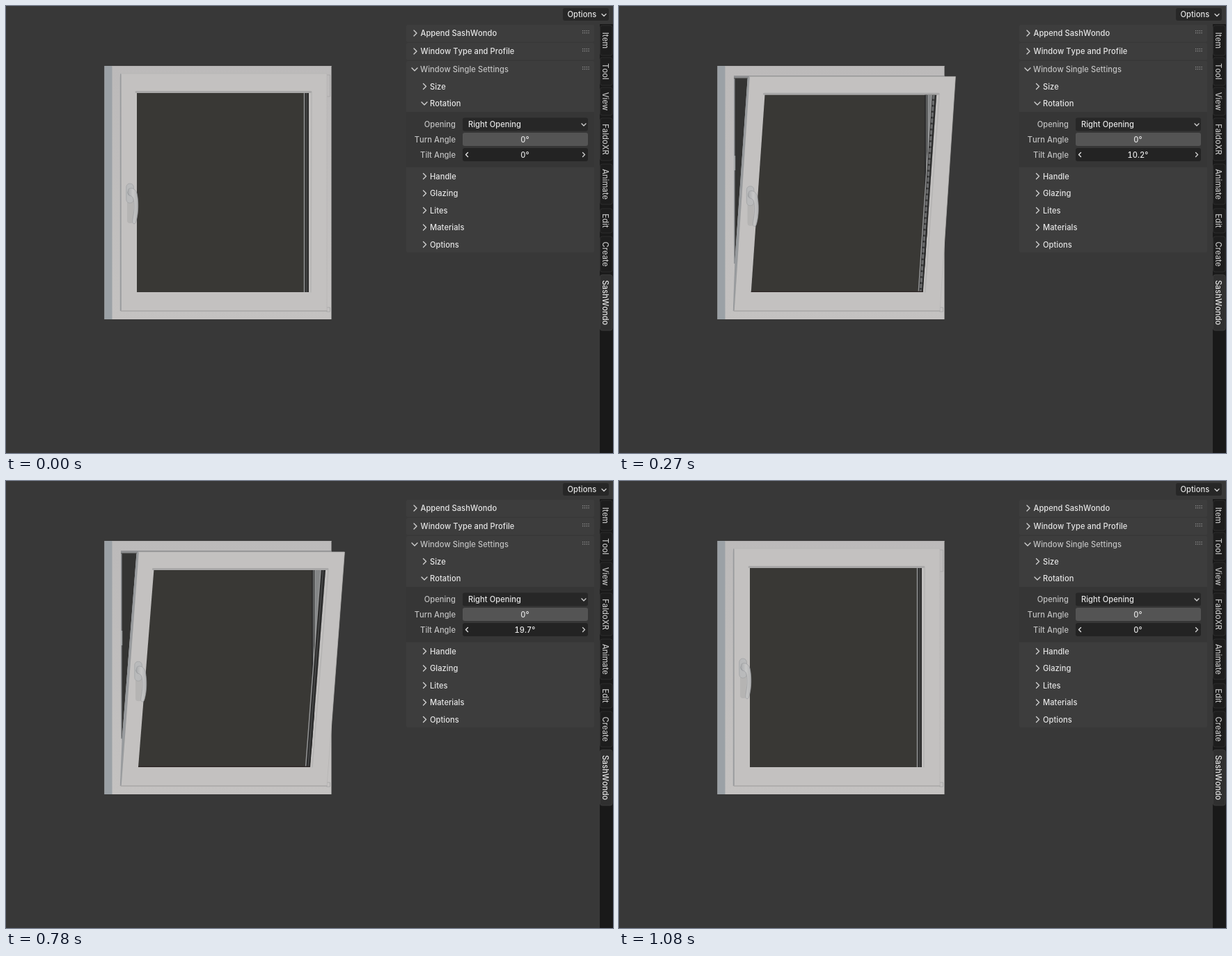
Write an HTML page that moves like this. It is 872x642 px and loops after 1.26 s.

```html
<!DOCTYPE html>
<html lang="en">
<head>
<meta charset="utf-8">
<title>Tilting window</title>
<style>
  html, body { margin: 0; width: 100%; height: 100%; overflow: hidden; background: #383838; }
  svg { display: block; width: 872px; height: 642px; }
  text {
    font: 500 11.1px Inter, "Open Sans", sans-serif;
    font-kerning: none;
    font-variant-numeric: tabular-nums;
    letter-spacing: .06px;
    fill: #e6e6e6;
  }
  .dim { fill: #c2c2c2; }
  .tab { fill: #c4c4c4; }
  .line { fill: none; stroke-linecap: round; stroke-linejoin: round; }
  .dash { fill: none; }
</style>
</head>
<body>
<svg viewBox="0 0 872 642" xmlns="http://www.w3.org/2000/svg">
  <defs>
    <linearGradient id="lever" x1="0" x2="1">
      <stop offset="0" stop-color="#a9abad"/>
      <stop offset=".5" stop-color="#c6c6c6"/>
      <stop offset="1" stop-color="#b2b3b4"/>
    </linearGradient>
    <linearGradient id="sill" x1="0" x2="0" y1="0" y2="1">
      <stop offset="0" stop-color="#bcbaba"/>
      <stop offset="1" stop-color="#c4c2c1"/>
    </linearGradient>
    <clipPath id="pane"><polygon id="paneClip"/></clipPath>
  </defs>
  <rect width="872" height="642" fill="#383838"/>

  <g id="window">
    <rect x="141.500" y="86" width="326" height="364" fill="url(#sill)"/>
    <rect x="141.500" y="86" width="11" height="364" fill="#9ba1a6"/>
    <path d="M153 86.500H467" stroke="#b3b1b1" class="line"/>
    <g class="line" stroke="#aaa9a9">
      <path id="topHinge" d="M461 99H465.500V130H461"/>
      <path d="M461 433H465.500V439H461Z"/>
    </g>
    <g id="gap">
      <rect x="165" y="100" width="302" height="3.500" fill="#8f9092"/>
      <path d="M166 104V370" stroke="#929598" stroke-width="2"/>
      <polygon id="hole" fill="#343433"/>
      <path d="M165 103.800H188" stroke="#4b4b4b"/>
      <rect x="165" y="215" width="2.200" height="21" fill="#a2a5a7"/>
    </g>
    <polygon id="side" fill="#979a9d"/>
    <polygon id="sash" fill="#c3c1c0" stroke="#b6b5b4" stroke-width=".8" stroke-linejoin="round"/>
    <path id="leftEdge" class="line" stroke="#999b9d" stroke-width="1.500"/>
    <path id="leftDots" class="dash" stroke="#68696a" stroke-width="1.500" stroke-dasharray="4 6"/>
    <path d="M165 438H461" stroke="#a09f9f" class="line"/>
    <path id="rim" class="line" stroke="#a9a8a8" stroke-width="3"/>
    <path id="rimSide" class="line" stroke="#b5b4b3" stroke-width="1.500"/>
    <polygon id="glass" fill="#393835"/>
    <g clip-path="url(#pane)">
      <rect x="443" y="120" width="30" height="292" fill="#858788"/>
      <path d="M441 120V411" stroke="#2b2b2b" stroke-width="4"/>
      <path d="M441.500 120V411" stroke="#808282"/>
      <polygon id="strip" fill="#2c2c2c"/>
      <path id="stripLine" class="line" stroke="#939495" stroke-width="1.500"/>
      <path id="stripMid" class="line" stroke="#555657"/>
      <path id="stripDots" class="dash" stroke="#6c6d6e" stroke-width="3" stroke-dasharray="6 2.500"/>
      <path id="bottomEdge" d="M188 410.300H440" stroke="#302929" stroke-width="1.600"/>
    </g>
    <g id="handle">
      <rect x="174" y="274" width="9" height="38" rx="4" fill="#b5b4b3"/>
      <rect x="172.800" y="255" width="10.500" height="28" rx="5" fill="#b9babb" stroke="#a3a4a5" stroke-width=".8"/>
      <circle cx="179" cy="268" r="4.500" fill="#96989a"/>
      <path d="M176 263C179 260 186 262 188 269C190.500 280 190.500 297 187 309Q185.500 315 182 311.500C181 308 184.500 297 184 286C183.500 275 182 273 177 272Q173.500 268 176 263Z"
            fill="url(#lever)" stroke="#9b9d9f" stroke-width=".7"/>
    </g>
  </g>

  <g id="ui"></g>
</svg>
<script>
const ui = document.getElementById('ui');
const $ = id => document.getElementById(id);

function add(tag, attrs, content) {
  const el = document.createElementNS('http://www.w3.org/2000/svg', tag);
  for (const k in attrs) el.setAttribute(k, attrs[k]);
  if (content) el.textContent = content;
  return ui.appendChild(el);
}
const box = (x, y, width, height, fill, rx = 0) => add('rect', { x, y, width, height, fill, rx });
const label = (x, y, s, cls = '', anchor = 'start') =>
  add('text', { x, y: y + 4, class: cls, 'text-anchor': anchor }, s);
const stroke = (d, color = '#cfcfcf', w = 1.4) =>
  add('path', { d, class: 'line', stroke: color, 'stroke-width': w });
const right = (x, y, r = 4) => stroke(`M${x - r / 2} ${y - r}l${r} ${r}l${-r} ${r}`);
const left = (x, y, r = 3) => stroke(`M${x + r / 2} ${y - r}l${-r} ${r}l${r} ${r}`, '#e6e6e6');
const down = (x, y, r = 4) => stroke(`M${x - r} ${y - r / 2}l${r} ${r}l${r} ${-r}`);

function grip(y) {
  for (let i = 0; i < 8; i++) box(828 + (i % 4) * 2.8, y - 3 + (i >> 2) * 3, 1.3, 1.3, '#8d8d8d');
}

// Header button
box(800, 3, 66, 18, '#272727', 3);
label(806.5, 12, 'Options');
down(859, 13, 3);

// Panels
box(575, 27, 270, 24.5, '#3d3d3d', 2);
box(575, 53, 270, 24.5, '#3d3d3d', 2);
box(575, 79, 270, 275, '#3d3d3d', 2);
box(575, 152, 270, 79.5, '#363636');
[39, 65, 91].forEach(y => grip(y - 1));
right(588, 39);
label(595.5, 39, 'Append SashWondo');
right(588, 65);
label(595.5, 65, 'Window Type and Profile');
down(587, 91);
label(595, 91, 'Window Single Settings', 'dim');
down(601, 140);
label(609, 140, 'Rotation');
const sections = { Size: 115.5, Handle: 244.5, Glazing: 269, Lites: 293.5, Materials: 318, Options: 342.5 };
for (const name in sections) {
  right(601.5, sections[name]);
  label(609, sections[name], name);
}

// Rotation fields
label(646, 169.5, 'Opening', 'dim', 'end');
label(646, 191.5, 'Turn Angle', 'dim', 'end');
label(646, 213.5, 'Tilt Angle', 'dim', 'end');
box(656, 160.5, 180, 19, '#272727', 3);
label(664, 169.5, 'Right Opening');
down(830, 170.5, 3);
box(656, 182, 180, 19, '#545454', 3);
label(745.5, 191.5, '0°', '', 'middle');
box(656, 204, 180, 19, '#232323', 3);
left(662, 213.5);
right(830, 213.5, 3);
const tilt = label(745.5, 213.5, '0°', '', 'middle');

// Side tabs
box(853, 26, 19, 616, '#191919');
[['Item', 28, 71], ['Tool', 74, 114], ['View', 117, 157], ['FaldoXR', 161, 222],
 ['Animate', 227, 285], ['Edit', 291, 326], ['Create', 331, 382], ['SashWondo', 386, 466]
].forEach(([name, y0, y1], i) => {
  const on = i === 7;
  const tab = box(853.5, y0, 17.5, y1 - y0, on ? '#303030' : '#1d1d1d', 3);
  tab.setAttribute('stroke', on ? '#3a3a3a' : '#2d2d2d');
  const y = (y0 + y1) / 2;
  const t = label(861, y, name, on ? '' : 'tab', 'middle');
  t.setAttribute('transform', `rotate(90 861 ${y})`);
});

// start ms, degrees shown, opening amount
const steps = [
  [0, 0, 0], [90, 0.8, .08], [120, 2.6, .27], [150, 5.1, .54], [180, 8.03, .84],
  [270, 10.2, .88], [300, 13.1, .9], [330, 16, .92], [360, 18.5, .94], [390, 19.7, .96],
  [480, 19.7, .98], [510, 19.7, 1], [840, 17.2, 1], [900, 10.6, .96], [930, 7.13, .79],
  [990, 4.94, .52], [1020, 2.83, .3], [1050, 1.17, .12], [1080, 0, 0]
];
const loop = 1260;

const points = (id, ...p) => $(id).setAttribute('points', p.map(q => q.join()).join(' '));
const path = (id, a, b) => $(id).setAttribute('d', `M${a}L${b}`);
const show = (id, on) => { $(id).style.display = on ? '' : 'none'; };

function pose(p, t) {
  const open = p > 0;
  const top = 97 + 5 * p, paneTop = 125 + 3 * p;
  const sideX = 164 + 23.5 * p, frontX = 164.8 + 25.2 * p;
  const meet = open ? Math.max(104, 438 - 65 / p) : 104;
  const tl = [188 + 24.4 * p, paneTop], tr = [435 + 24 * p, paneTop];
  const br = [435 + 2 * p, 411], bl = [188 + 2 * p, 411];
  const lineTop = [428.5 + 23.5 * p, paneTop], lineEnd = [428.5 + 2 * p, 411];

  show('gap', open);
  show('topHinge', !open);
  show('bottomEdge', open);
  points('hole', [166.5, 104], [Math.max(166.5, sideX), 104], [166.5, meet]);
  points('side', [sideX, top + 2], [frontX, top], [165, 438], [163.8, 438],
    [open ? Math.min(166.5, sideX) : 163.8, meet]);
  points('sash', [frontX, top], [461 + 25.4 * p, top], [461, 438], [165, 438]);
  path('leftEdge', [frontX, top + 1], [165, 437]);
  points('glass', tl, tr, br, bl);
  points('paneClip', tl, tr, br, bl);
  path('rim', [tl[0] - 1, paneTop - 1.5], [tr[0] + 3, paneTop - 1.5]);
  path('rimSide', [tr[0] + 4, paneTop], [br[0] + 3, 411]);
  points('strip', lineTop, tr, br, lineEnd);
  path('stripLine', lineTop, lineEnd);
  path('stripMid', [lineTop[0] + 3.5, paneTop], [lineEnd[0] + 3.5, 411]);

  // coarse edges while the sash is in motion
  show('stripDots', open && t < 300);
  show('leftDots', open && t >= 900);
  path('stripDots', [lineTop[0] + 3, paneTop], [lineEnd[0] + 3, 411]);
  path('leftDots', [sideX - .5, 108], [168, 350]);
  $('handle').setAttribute('transform', `translate(${12 * p} ${4.3 * p})`);
}

let shown = null;
function draw(now) {
  const t = now % loop;
  const step = steps.findLast(s => s[0] <= t) || steps[0];
  if (step !== shown) {
    shown = step;
    pose(step[2], step[0]);
    tilt.textContent = step[1] + '°';
  }
}
const start = performance.now();
function tick() {
  draw(performance.now() - start);
  requestAnimationFrame(tick);
}
tick();
</script>
</body>
</html>
```
